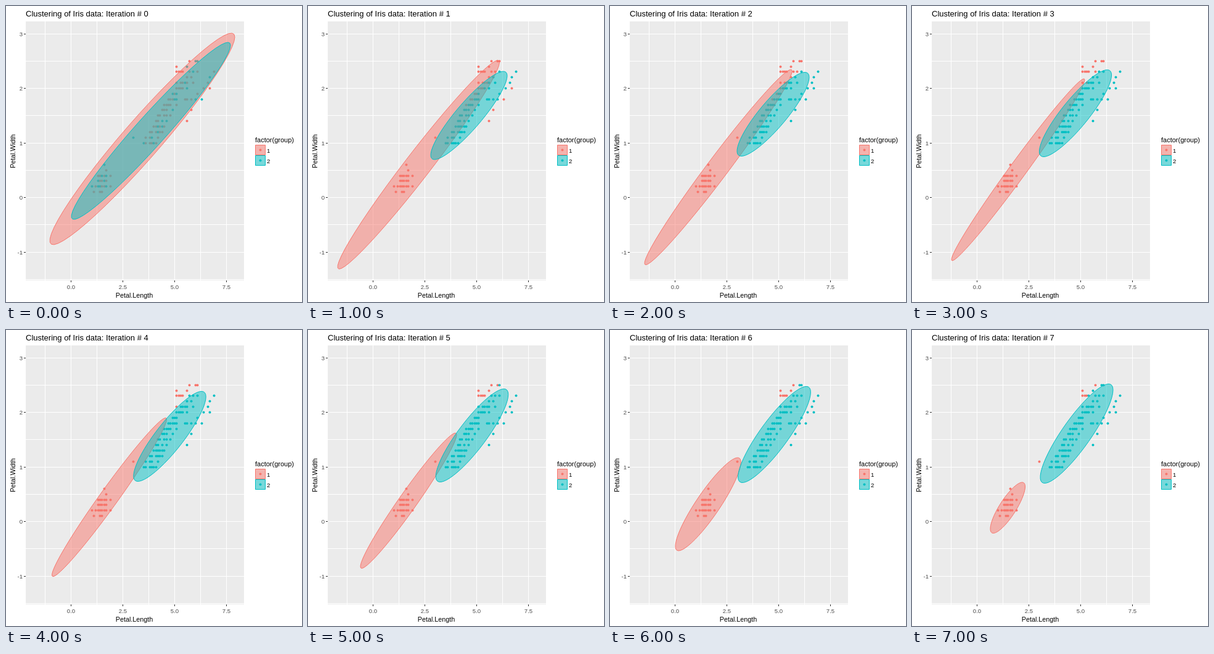
An HTML page with a canvas that plays this animation: 480x480 px, repeating every 8 s.

```html
<!DOCTYPE html>
<html lang="en">
<head>
<meta charset="utf-8">
<style>
html, body { margin: 0; overflow: hidden; }
canvas { display: block; }
</style>
</head>
<body>
<canvas id="stage" width="480" height="480"></canvas>
<script>
const ctx = document.getElementById('stage').getContext('2d');
const RED = '#F8766D', TEAL = '#00BFC4';
const px = v => 105 + 33.6 * v;
const py = v => 310 - 88.5 * v;
const snap = v => Math.round(v) + .5;
const random = seed => Math.abs(Math.sin(seed) * 43758.5453) % 1;

// Petal sizes in mm: two clouds made by rule, then the few points around them.
const points = [];
const add = (width, ...lengths) => lengths.forEach(length => points.push({ length, width }));

for (let width = 2; width <= 4; width++) add(width, 13, 14, 15, 16, 17);
for (let width = 10; width <= 21; width++) {
  const middle = Math.round(38 + 1.45 * (width - 10));
  for (let length = middle - 3; length <= middle + 3; length++) {
    if (random(width * 100 + length) > .35) add(width, length);
  }
}
add(1, 11, 14, 15);
add(2, 10, 12, 19);
add(4, 19);
add(5, 17);
add(6, 16);
add(11, 30);
add(14, 56);
add(16, 58);
add(18, 55, 56, 58, 60, 63);
add(19, 61);
add(20, 64, 67);
add(21, 59, 66);
add(22, 56, 58, 67);
add(23, 51, 52, 53, 54, 57, 59, 61, 69);
add(24, 51, 56);
add(25, 57, 60, 61);

// Key poses by iteration: left, top, right, bottom, correlation.
const redPoses = {
  0: [71, 44, 371, 387, .963],
  1: [48, 88, 310.5, 426.5, .98],
  3: [64, 118, 280, 413, .988],
  5: [85, 167, 241, 386.5, .974],
  7: [127, 247, 183.5, 329.5, .83]
};
const tealPoses = {
  0: [106, 59, 364, 346, .968],
  1: [199, 106, 323, 249, .9],
  2: [206, 107.5, 323, 243.5, .88],
  7: [208, 87.5, 326, 248.5, .88]
};

function poseAt(poses, step) {
  const keys = Object.keys(poses).map(Number);
  const next = keys.find(k => k >= step);
  const prev = keys.findLast(k => k <= step);
  const part = next > prev ? (step - prev) / (next - prev) : 0;
  return poses[prev].map((v, i) => v + (poses[next][i] - v) * part);
}

// Short petals stay in group 1; wide ones leave it in order of their excess width.
function isRed({ length, width }, step) {
  if (step === 0) return random(length * 7 + width * 31) < .5;
  const excess = width - .42 * length;
  return length < 32 || step <= 5.6 + 2 * excess || (step === 1 && excess < -8);
}

function line(x1, y1, x2, y2, color) {
  ctx.strokeStyle = color;
  ctx.lineWidth = 1;
  ctx.beginPath();
  ctx.moveTo(x1, y1);
  ctx.lineTo(x2, y2);
  ctx.stroke();
}

function text(str, x, y, size, color = '#000', align = 'left') {
  ctx.font = `${size}px "Liberation Sans", Arial, sans-serif`;
  ctx.fillStyle = color;
  ctx.textAlign = align;
  ctx.fillText(str, x, y);
}

function dot(x, y, color) {
  ctx.fillStyle = color;
  ctx.beginPath();
  ctx.arc(x, y, 2, 0, 2 * Math.PI);
  ctx.fill();
}

function fillAndOutline(color) {
  ctx.fillStyle = color + '80';
  ctx.strokeStyle = color;
  ctx.lineWidth = 1;
  ctx.fill();
  ctx.stroke();
}

function ellipse([left, top, right, bottom, correlation], color) {
  const a = (right - left) / 2, b = (bottom - top) / 2;
  const segments = 51, phase = Math.acos(correlation);
  ctx.beginPath();
  for (let i = 0; i < segments; i++) {
    const t = 2 * Math.PI * i / segments;
    ctx.lineTo(left + a + a * Math.cos(t), top + b - b * Math.cos(t - phase));
  }
  ctx.closePath();
  fillAndOutline(color);
}

function drawAxes() {
  ctx.fillStyle = '#fff';
  ctx.fillRect(0, 0, 480, 480);
  ctx.fillStyle = '#EBEBEB';
  ctx.fillRect(32, 25, 354, 420);
  for (let v = -1.5; v <= 3; v += .5) {
    const y = snap(py(v));
    line(32, y, 386, y, '#fff');
    if (v % 1) continue;
    line(29, y, 32, y, '#333');
    text(v, 27, y + 3.5, 9.6, '#4D4D4D', 'right');
  }
  for (let v = -1.25; v <= 7.5; v += 1.25) {
    const x = snap(px(v));
    line(x, 25, x, 445, '#fff');
    if (v % 2.5) continue;
    line(x, 445, x, 448, '#333');
    text(v.toFixed(1), x, 459, 9.6, '#4D4D4D', 'center');
  }
  text('Petal.Length', 208, 473, 10.8, '#000', 'center');
  ctx.save();
  ctx.translate(15, 235.5);
  ctx.rotate(-Math.PI / 2);
  text('Petal.Width', 0, 0, 10.8, '#000', 'center');
  ctx.restore();
}

function drawLegend() {
  text('factor(group)', 404, 221, 11);
  [RED, TEAL].forEach((color, i) => {
    const y = 225 + i * 17;
    ctx.fillStyle = '#F2F2F2';
    ctx.fillRect(404, y, 17, 17);
    dot(412.5, y + 8.5, color);
    ctx.beginPath();
    ctx.rect(404.5, y + .5, 16, 16);
    fillAndOutline(color);
    text(i + 1, 423, y + 12.5, 9.6);
  });
}

function frame() {
  const step = Math.floor(performance.now() / 1000) % 8;
  drawAxes();
  for (const p of points) {
    dot(snap(px(p.length / 10)), snap(py(p.width / 10)), isRed(p, step) ? RED : TEAL);
  }
  ellipse(poseAt(redPoses, step), RED);
  ellipse(poseAt(tealPoses, step), TEAL);
  drawLegend();
  text('Clustering of Iris data: Iteration # ' + step, 32, 17, 13);
  requestAnimationFrame(frame);
}
requestAnimationFrame(frame);
</script>
</body>
</html>
```
